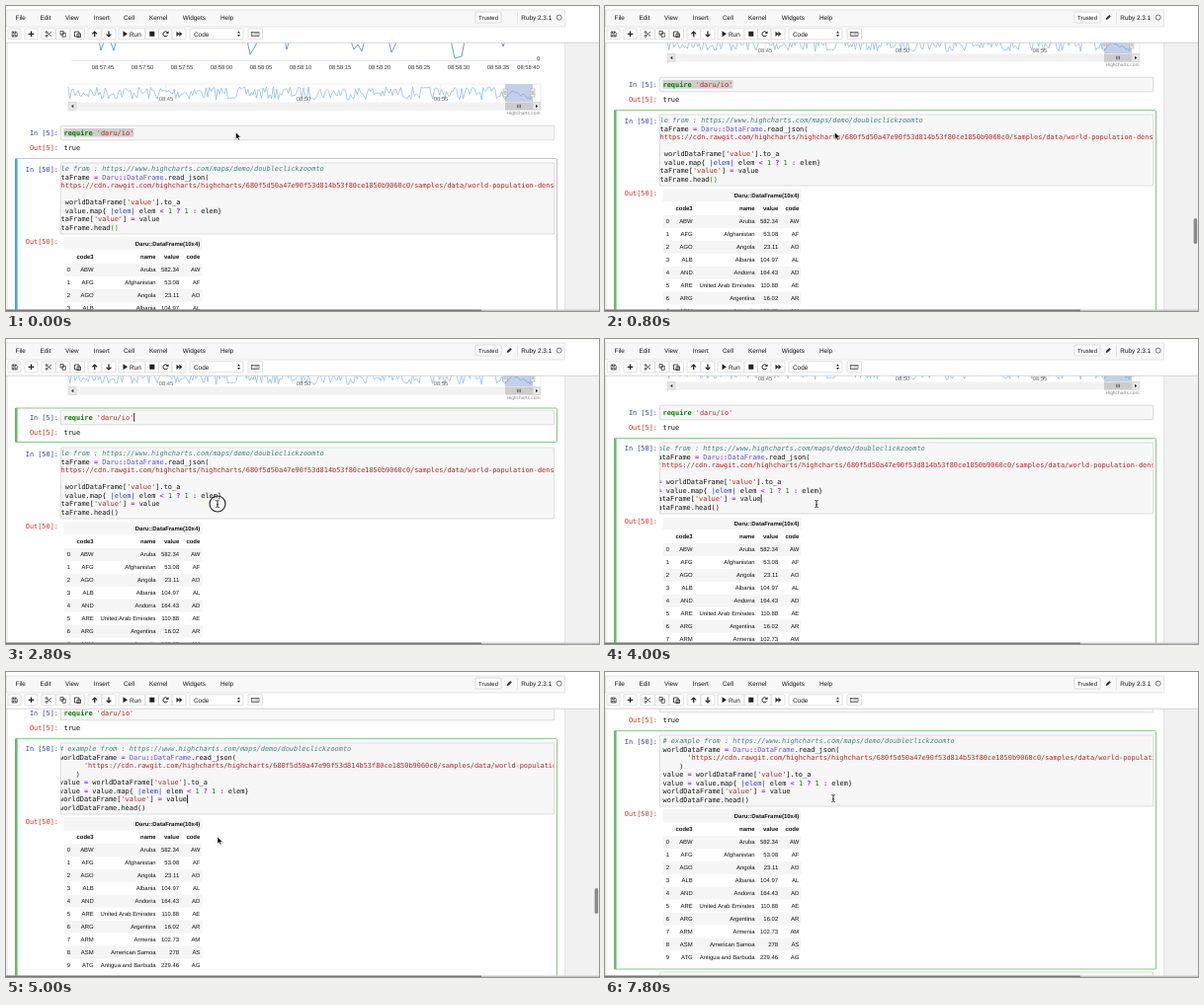
An HTML page that plays this animation: 600 by 309 pixels, repeating every 8 s.

```html
<!DOCTYPE html>
<html lang="en">
<head>
<meta charset="utf-8">
<title>Notebook session</title>
<style>
  html, body { margin: 0; width: 100%; height: 100%; overflow: hidden; background: #fff; }
  svg { display: block; width: 100%; height: 100%; }
  text { font: 6.4px "Liberation Sans", Arial, sans-serif; fill: #111; white-space: pre; text-rendering: geometricPrecision; }
  .mono { font: 6.92px "DejaVu Sans Mono", monospace; }
  .cell { font-size: 5.95px; }
  .axis { font-size: 5.8px; fill: #333; }
  .bold, .keyword, .op { font-weight: bold; }
  .keyword { fill: #008000; }
  .op { fill: #a2f; }
  .string { fill: #ba2121; }
  .number { fill: #080; }
  .constant { fill: #5a55e8; }
  .param { fill: #2233dd; }
  .comment { fill: #408080; font-style: italic; }
  .in { fill: #303f9f; }
  .out { fill: #d32f20; }
</style>
</head>
<body>
<script>
const LOOP = 8000, CHAR = 4.166, LINE = 8.45, CODE_X = 58.5;
const BLUE = '#7cb5ec', GREEN = '#66bb6a', EDGE = '#cfcfcf';

function add(parent, tag, attrs = {}, content = '') {
  const node = document.createElementNS('http://www.w3.org/2000/svg', tag);
  for (const key in attrs) node.setAttribute(key, attrs[key]);
  node.textContent = content;
  return parent.appendChild(node);
}
const group = (parent, attrs) => add(parent, 'g', attrs);
const rect = (parent, x, y, width, height, fill, more = {}) =>
  add(parent, 'rect', { x, y, width, height, fill, ...more });
const path = (parent, d, stroke, width = 1, fill = 'none') =>
  add(parent, 'path', { d, stroke, 'stroke-width': width, fill });
const text = (parent, x, y, string, cls = '', anchor = 'start') =>
  add(parent, 'text', { x, y, class: cls, 'text-anchor': anchor }, string);
const show = (node, on) => node.setAttribute('visibility', on ? 'visible' : 'hidden');
const move = (node, x, y) => node.setAttribute('transform', `translate(${x} ${y})`);

// Linear interpolation through [time, value] points.
function track(t, points) {
  let [t0, v0] = points[0];
  for (const [t1, v1] of points) {
    if (t < t1) return v0 + (v1 - v0) * Math.max(0, (t - t0) / (t1 - t0));
    [t0, v0] = [t1, v1];
  }
  return v0;
}

let seed = 7;
const random = () => (seed = seed * 16807 % 2147483647) / 2147483647;

const TOKENS = [
  ['comment', /^#.*/], ['string', /^'[^']*'/], ['keyword', /^require\b/],
  ['param', /^\|\w+\|/], ['constant', /^[A-Z]\w*/], ['number', /^\d+/],
  ['op', /^(::|[=<?:])/], ['', /^(\w+|\s+|.)/]
];
function codeLine(parent, y, source) {
  const line = text(parent, CODE_X, y, '', 'mono');
  while (source) {
    const [cls, pattern] = TOKENS.find(([, p]) => p.test(source));
    const token = source.match(pattern)[0];
    add(line, 'tspan', { class: cls }, token);
    source = source.slice(token.length);
  }
  return line;
}

const svg = add(document.body, 'svg', { viewBox: '0 0 600 309' });
rect(svg, 0, 0, 600, 309, '#f1f1f1');
rect(svg, 1, 30, 564.5, 279, '#fff', { stroke: '#ddd', 'stroke-width': .8 });
const page = group(svg);

// Chart
function drawChart() {
  path(page, 'M93 30L96 45L99 36L105 34L109 45L113 30M243 30L247 49L253 39L257 30' +
    'M281 30L284 44L288 30M347 30L352 44L356 39L360 46L364 30M386 30L390 47L395 37L399 30' +
    'M449 30L454 53L461 51L465 30M499 30L503 41L507 30', '#4a97dc', .9);
  path(page, 'M66 55.3H541', '#ccd6eb', .7);
  text(page, 537, 54.5, '0', 'axis');
  for (let i = 0; i < 12; i++) {
    const seconds = 45 + i * 5;
    const label = `08:${57 + Math.floor(seconds / 60)}:${String(seconds % 60).padStart(2, '0')}`;
    const x = i < 11 ? 98 + i * 40 : 528.5;
    text(page, x, 64.3, label, 'axis', 'middle');
    path(page, `M${x} 55.3v3`, '#ccd6eb', .6);
  }
  const points = [];
  for (let x = 63; x < 535; x += 1.7)
    points.push(`${x.toFixed(1)} ${(82 + 13 * random() ** 1.2).toFixed(1)}`);
  path(page, 'M' + points.join('L'), BLUE, .7);
  path(page, 'M63 79V97M63 79H505M533 79H541V97M162 79V97M301 79V97M440 79V97', '#ddd', .5);
  ['08:45', '08:50', '08:55'].forEach((label, i) =>
    text(page, 162 + i * 139, 96, label, 'axis', 'middle').setAttribute('fill-opacity', .75));
  rect(page, 505, 79, 28, 18, '#6685c2', { 'fill-opacity': .38 });
  rect(page, 63, 97.5, 478, 8, '#f2f2f2');
  rect(page, 505, 97.5, 28, 8, '#cccccc');
  for (const x of [63, 533]) rect(page, x, 97.5, 8, 8, '#e6e6e6', { stroke: '#ccc', 'stroke-width': .5 });
  path(page, 'M68.3 99.8V103.2L66 101.5ZM536 99.8V103.2L538.3 101.5Z', 'none', 0, '#333');
  path(page, 'M517.5 99.8v3.4M519 99.8v3.4M520.5 99.8v3.4', '#333', .6);
  for (const x of [505, 533]) {
    rect(page, x - 2, 84, 4, 8, '#f2f2f2', { stroke: '#999', 'stroke-width': .5 });
    path(page, `M${x - .6} 86v4M${x + .6} 86v4`, '#777', .4);
  }
  text(page, 540.5, 110, 'Highcharts.com', '', 'end').setAttribute('style', 'font-size:4.9px;fill:#888');
}
drawChart();

// Cells
function cellFrame(y, height) {
  const g = group(page);
  const box = rect(g, 9.5, y, 548, height, 'none', { 'stroke-width': .8, rx: 1 });
  const bar = rect(g, 9, y, 2.6, height);
  return (border, accent = border) => {
    show(g, border);
    box.setAttribute('stroke', border || 'none');
    bar.setAttribute('fill', accent || 'none');
  };
}
const input = (y, height) => rect(page, 55.3, y, 499.4, height, '#f7f7f7', { stroke: EDGE, 'stroke-width': .7, rx: .8 });
const prompt = (y, label, cls) => text(page, 53, y, label, 'mono ' + cls, 'end');

const frameSmall = cellFrame(119, 34.5);
const frameLarge = cellFrame(154.6, 241.4);

input(121.2, 14.6);
prompt(130.7, 'In [5]:', 'in');
prompt(146.2, 'Out[5]:', 'out');
text(page, CODE_X, 146.4, 'true', 'mono');
const selection = rect(page, CODE_X, 124, 17 * CHAR, 8.6, '#cfcfcf');
codeLine(page, 130.7, "require 'daru/io'");
const caretSmall = rect(page, CODE_X + 17 * CHAR, 124, .8, 8.6, '#000');

input(159, 72);
prompt(167.5, 'In [50]:', 'in');
const clip = add(add(svg, 'defs'), 'clipPath', { id: 'code-area' });
rect(clip, 55.6, 159.4, 498.8, 71.4);
const code = group(group(page, { 'clip-path': 'url(#code-area)' }));
const lines = [
  '# example from : https://www.highcharts.com/maps/demo/doubleclickzoomto',
  'worldDataFrame = Daru::DataFrame.read_json(',
  "      'https://cdn.rawgit.com/highcharts/highcharts/680f5d50a47e90f53d814b53f80ce1850b9060c0/samples/data/world-population-density.json'",
  '    )',
  "value = worldDataFrame['value'].to_a",
  'value = value.map{ |elem| elem < 1 ? 1 : elem}',
  "worldDataFrame['value'] = value",
  'worldDataFrame.head()'
].map((source, i) => codeLine(code, 167.4 + i * LINE, source));
const brackets = [...lines[7].children].slice(-2);
const caretLarge = rect(code, CODE_X + 31 * CHAR, 211.5, .8, 8.4, '#000');
const codeScroll = rect(page, 58.5, 226.3, 430, 3.6, '#7c7c7c', { rx: 1.8 });

// Table
function drawTable() {
  prompt(241, 'Out[50]:', 'out');
  const rows = `ABW,Aruba,582.34,AW;AFG,Afghanistan,53.08,AF;AGO,Angola,23.11,AO;ALB,Albania,104.97,AL;
AND,Andorra,164.43,AD;ARE,United Arab Emirates,110.88,AE;ARG,Argentina,16.02,AR;ARM,Armenia,102.73,AM;
ASM,American Samoa,278,AS;ATG,Antigua and Barbuda,229.46,AG`.split(';').map(row => row.trim().split(','));
  const right = [88.7, 151.6, 175.2, 196.3];
  const put = (cells, y, cls) => cells.forEach((value, i) => text(page, right[i], y, value, 'cell ' + cls, 'end'));
  rect(page, 58.5, 234.5, 140, 12.8, '#f5f5f5');
  text(page, 163.5, 242.7, 'Daru::DataFrame(10x4)', 'cell bold', 'middle');
  put(['code3', 'name', 'value', 'code'], 256.3, 'bold');
  rows.forEach((row, i) => {
    const y = 261 + i * 12.93;
    if (i % 2 === 0) rect(page, 58.5, y, 140, 12.93, '#f5f5f5');
    text(page, 65, y + 8.3, i, 'cell', 'end');
    put(row, y + 8.3, '');
  });
}
drawTable();
input(399, 16);

// Menu and toolbar
function drawHeader() {
  rect(svg, 0, 0, 600, 37, '#fff');
  rect(svg, .5, 4, 565, 17, '#f8f8f8', { stroke: '#e0e0e0', 'stroke-width': .8 });
  path(svg, 'M0 37.2H600', '#d2d2d2', .9);
  const menu = { File: 9.5, Edit: 34.5, View: 60, Insert: 88.8, Cell: 119, Kernel: 145, Widgets: 178.8, Help: 217 };
  for (const name in menu) text(svg, menu[name], 13.8, name);
  rect(svg, 475, 6, 26, 11, '#fff', { stroke: '#ccc', 'stroke-width': .7, rx: 1 });
  text(svg, 488, 13.8, 'Trusted', 'cell', 'middle');
  path(svg, 'M517.5 6V18', '#ddd', .7);
  text(svg, 521.3, 13.8, 'Ruby 2.3.1');
  add(svg, 'circle', { cx: 559.7, cy: 11.6, r: 2.5, fill: 'none', stroke: '#444', 'stroke-width': .7 });

  const buttons = [[2, 13], [19, 13], [36, 14.5], [50.5, 14.5], [65, 14.5], [83, 14], [97, 14], [114, 27],
    [141, 13.5], [154.5, 13.5], [168, 14], [186, 54], [245, 14.5]];
  for (const [x, width] of buttons)
    rect(svg, x, 22.8, width, 11, '#fff', { stroke: '#ccc', 'stroke-width': .6, rx: .8 });
  const ink = '#222';
  path(svg, 'M6.2 26H10L11.2 27.2V31H6.2ZM7.5 26V27.7H9.6V26M7.3 31V29.2H10V31', ink, .7);
  path(svg, 'M25.5 25.5V31.1M22.7 28.3H28.3M89.7 31.3V26M104 25.5V31', ink, 1.3);
  path(svg, 'M87.3 28.4L89.7 26L92.1 28.4M101.6 28.6L104 31L106.4 28.6', ink, 1.2);
  path(svg, 'M41.5 27L46 30.6M41.5 30L46 26.2', ink, .7);
  for (const y of [26.5, 30.4]) add(svg, 'circle', { cx: 41, cy: y, r: 1, fill: 'none', stroke: ink, 'stroke-width': .7 });
  path(svg, 'M55 25.5H58.2V29H55ZM57 27.3H60.3V31.3H57Z', ink, .7, '#fff');
  path(svg, 'M69.5 26H74V31H69.5ZM72 28H75.5V31.5H72Z', ink, .8, '#fff');
  path(svg, 'M118.5 25.3L123 28.3L118.5 31.3ZM145.3 25.8H150.3V30.8H145.3ZM172.5 25.7L175.4 28.3L172.5 30.9Z' +
    'M175.4 25.7L178.3 28.3L175.4 30.9Z', 'none', 0, ink);
  text(svg, 125, 30.5, 'Run');
  path(svg, 'M163.4 26.7A2.5 2.5 0 1 0 163.7 29.5', ink, 1);
  path(svg, 'M164.5 25.3V28H161.8Z', 'none', 0, ink);
  text(svg, 190, 30.5, 'Code');
  path(svg, 'M234 27.6L235.5 25.5L237 27.6ZM234 29L235.5 31.1L237 29Z', 'none', 0, ink);
  rect(svg, 248.6, 26.3, 7.4, 4.2, 'none', { stroke: ink, 'stroke-width': .6 });
  path(svg, 'M249.6 27.6H255.2M249.6 29.2H255.2', ink, .6).setAttribute('stroke-dasharray', '.7 .5');
}
drawHeader();
const pencil = path(svg, 'M506.7 14L507.2 12L510.3 8.9L511.8 10.4L508.7 13.5Z', 'none', 0, '#333');

const pageScroll = rect(svg, 595.6, 0, 3.6, 26, '#8a8a8a', { rx: 1.8 });
rect(svg, 0, 307.6, 600, 1.4, '#c4c4c4');
rect(svg, 0, 307.6, 481, 1.4, '#777');

// Pointers
const pointer = group(svg);
const arrow = path(pointer, 'M0 0V7L1.6 5.5L2.7 7.9L3.9 7.4L2.8 5H5Z', '#fff', .5, '#000');
const beam = path(pointer, 'M-1.7 -3.5Q0 -3.5 0 -2.6Q0 -3.5 1.7 -3.5M0 -2.6V2.6M-1.7 3.5Q0 3.5 0 2.6Q0 3.5 1.7 3.5M-1 .8H1', '#111', .8);
const ring = add(pointer, 'circle', { r: 8, fill: 'none', stroke: '#222', 'stroke-width': 1.1 });

const SCROLL = [[200, 0], [400, -28], [600, -46], [800, -49], [3800, -49], [4000, -54], [5000, -87], [5400, -95]];
const CODE_SHIFT = [[3800, -32], [4000, -30], [5000, -4.5], [5400, 0]];
const POINTER_X = [[1000, 232.5], [1500, 140], [1800, 140], [2500, 214], [5500, 214], [6300, 212], [7000, 212], [7600, 231]];
const POINTER_Y = [[1000, 128], [1500, 80], [1800, 80], [2500, 167], [5500, 167], [6300, 119], [7000, 119], [7600, 128]];
const FOCUS_SMALL = 1650, FOCUS_LARGE = 2850;

function draw(t) {
  const within = (from, to) => t >= from && t < to;
  const blink = since => (t - since) % 1060 < 530;
  const scroll = track(t, SCROLL);
  const editing = t >= 200;
  const inSmall = within(FOCUS_SMALL, FOCUS_LARGE);

  move(page, 0, scroll);
  move(code, track(t, CODE_SHIFT), 0);
  frameSmall(inSmall && GREEN);
  frameLarge(!inSmall && (editing ? GREEN : '#b5b5b5'), editing ? GREEN : '#42a5f5');
  show(pencil, editing);
  show(selection, t < FOCUS_SMALL);
  for (const bracket of brackets) bracket.setAttribute('class', t < FOCUS_SMALL ? 'number' : '');
  show(caretSmall, inSmall && blink(FOCUS_SMALL));
  show(caretLarge, t >= FOCUS_LARGE && blink(FOCUS_LARGE));
  show(codeScroll, within(6000, 7000));
  show(pageScroll, within(200, 1500) || within(4100, 5700));
  pageScroll.setAttribute('y', 215 - (scroll + 49) * .105);

  const useArrow = t < 1400 || within(4200, 5800);
  move(pointer, track(t, POINTER_X), track(t, POINTER_Y));
  show(arrow, useArrow);
  show(beam, !useArrow);
  show(ring, within(1550, 1750) || within(2700, 2950));
}

function tick() {
  draw(performance.now() % LOOP);
  requestAnimationFrame(tick);
}
tick();
</script>
</body>
</html>
```
